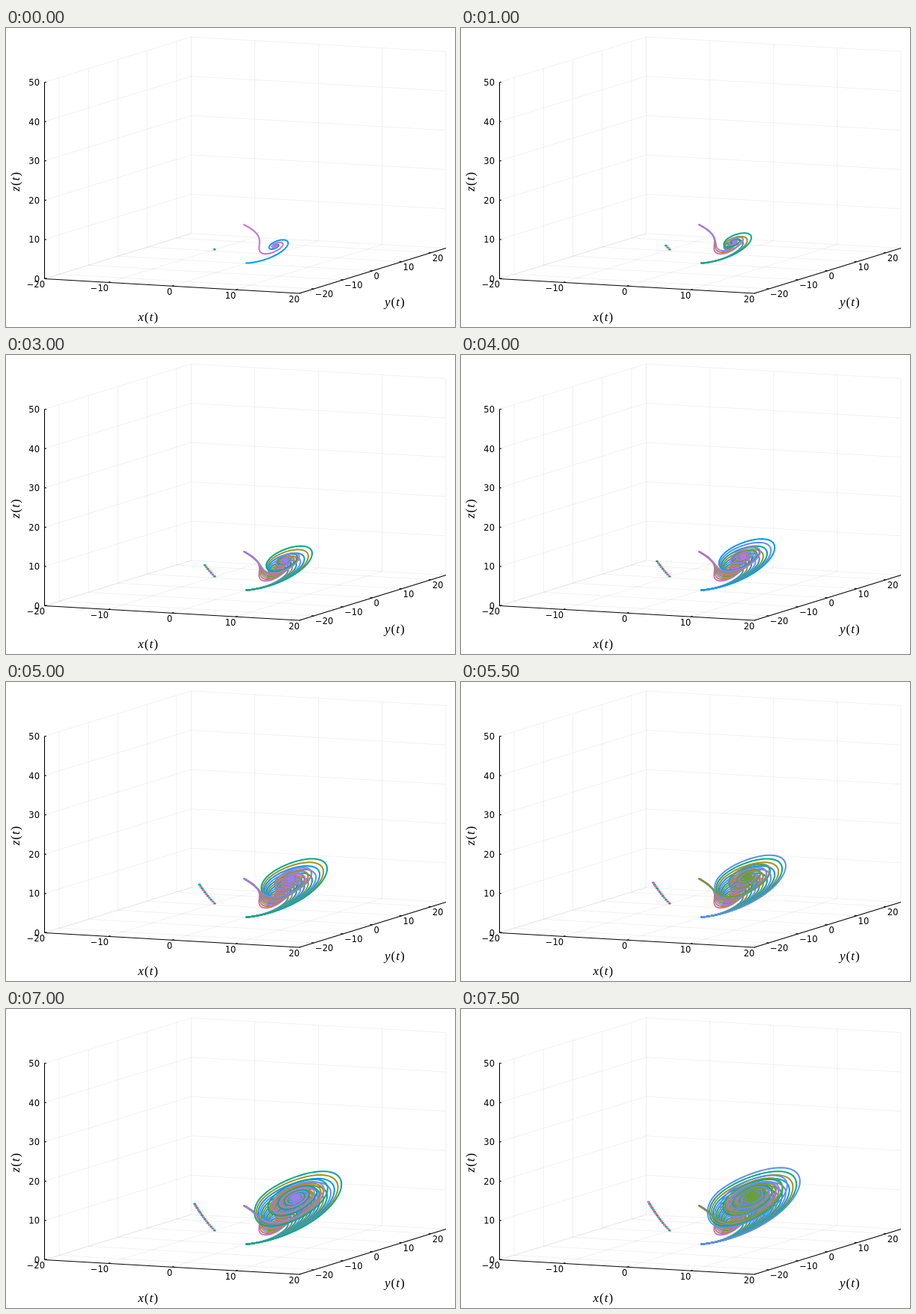
An HTML page with a canvas for the animation above (8000 ms loop, 600 px wide and 400 px high).

```html
<!DOCTYPE html>
<html lang="en">
<head>
<meta charset="utf-8">
<title>Lorenz trajectories</title>
<style>
  html, body { margin: 0; width: 600px; height: 400px; overflow: hidden; background: #fff; }
  canvas { display: block; }
</style>
</head>
<body>
<canvas id="stage" width="600" height="400"></canvas>
<script>
const ctx = document.getElementById('stage').getContext('2d');
const COLORS = ['#009afa', '#e36f47', '#3ea44e', '#c371d2', '#ac8e18', '#00aaae', '#ed5e93', '#c68225',
  '#00a98d', '#8e971e', '#00a9cc', '#9b7fe9', '#618df6', '#f06073', '#dd65b6', '#6c9f33'];
const SIGMA = 10, BETA = 8 / 3, STEPS = 16, STEP_MS = 500;

// Parallel projection of (x, y, z) to the stage
const project = ([x, y, z]) => [319.7 + 8.51 * x + 3.92 * y, 315 + 0.49 * x - 1.21 * y - 5.26 * z];

function line(a, b, color, width) {
  ctx.strokeStyle = color;
  ctx.lineWidth = width;
  ctx.beginPath();
  ctx.moveTo(...project(a));
  ctx.lineTo(...project(b));
  ctx.stroke();
}

function label(text, point, dx, dy, align) {
  const [x, y] = project(point);
  ctx.textAlign = align;
  ctx.fillText(String(text).replace('-', '\u2212'), x + dx, y + dy);
}

function mathLabel(name, x, y, angle = 0) {
  ctx.save();
  ctx.translate(x, y);
  ctx.rotate(angle);
  ctx.textAlign = 'left';
  ctx.textBaseline = 'alphabetic';
  let left = -13.5;
  for (const ch of name + '(t)') {
    ctx.font = (/[()]/.test(ch) ? '' : 'italic ') + '17px "Liberation Serif", serif';
    ctx.fillText(ch, left, 5);
    left += ctx.measureText(ch).width + 1;
  }
  ctx.restore();
}

function drawAxes() {
  const grid = 'rgba(0,0,0,0.1)', black = '#000';
  const ticks = [-20, -10, 0, 10, 20], heights = [0, 10, 20, 30, 40, 50];
  for (const v of ticks) {
    line([v, -25, 0], [v, 25, 0], grid, 0.6);
    line([v, 25, 0], [v, 25, 50], grid, 0.6);
    line([-20, v, 0], [20, v, 0], grid, 0.6);
    line([-20, v, 0], [-20, v, 50], grid, 0.6);
  }
  for (const z of heights) {
    line([-20, -25, z], [-20, 25, z], grid, 0.6);
    line([-20, 25, z], [20, 25, z], grid, 0.6);
  }
  line([-20, -25, 0], [-20, -25, 50], black, 1.1);
  line([-20, -25, 0], [20, -25, 0], black, 1.1);
  line([20, -25, 0], [20, 25, 0], black, 1.1);

  ctx.fillStyle = black;
  ctx.font = '11.5px "DejaVu Sans", sans-serif';
  ctx.textBaseline = 'middle';
  for (const v of ticks) {
    line([v, -25, 0], [v, -24.3, 0], black, 1);
    line([20, v, 0], [19.6, v, 0], black, 1);
    label(v, [v, -25, 0], 0.5, 9, 'right');
    label(v, [20, v, 0], 1.5, 8.5, 'left');
  }
  for (const z of heights) {
    line([-20, -25, z], [-19.7, -25, z], black, 1);
    label(z, [-20, -25, z], -6.5, 1.5, 'right');
  }
  mathLabel('x', 190, 387);
  mathLabel('y', 519.5, 367);
  mathLabel('z', 13, 205, -Math.PI / 2);
}

const flow = ([x, y, z], rho) => [SIGMA * (y - x), x * (rho - z) - y, x * y - BETA * z];
const shift = (u, k, h) => u.map((v, i) => v + h * k[i]);

// Runge-Kutta solution of the Lorenz system as a path
function trajectory(u, rho) {
  const path = new Path2D(), h = 0.01;
  path.moveTo(...project(u));
  for (let n = 0; n < 2500; n++) {
    const k1 = flow(u, rho);
    const k2 = flow(shift(u, k1, h / 2), rho);
    const k3 = flow(shift(u, k2, h / 2), rho);
    const k4 = flow(shift(u, k3, h), rho);
    u = u.map((v, i) => v + h / 6 * (k1[i] + 2 * k2[i] + 2 * k3[i] + k4[i]));
    path.lineTo(...project(u));
  }
  return path;
}

const series = [];
for (let step = 0; step < STEPS; step++) {
  const rho = 5 + step / 2, c = Math.sqrt(BETA * (rho - 1)), near = c + 0.1;
  const starts = [[0.1, 0.1, 0.1], [near, near, rho - 1], [-near, -near, rho - 1], [-1.2, 2.2, 9.25]];
  for (const start of starts) series.push(trajectory(start, rho));
}

let shown = -1;
function frame() {
  const step = Math.floor(performance.now() / STEP_MS) % STEPS;
  if (step !== shown) {
    shown = step;
    ctx.fillStyle = '#fff';
    ctx.fillRect(0, 0, 600, 400);
    ctx.lineCap = 'butt';
    drawAxes();
    ctx.lineCap = ctx.lineJoin = 'round';
    ctx.lineWidth = 2;
    series.slice(0, 4 * (step + 1)).forEach((path, i) => {
      ctx.strokeStyle = COLORS[i % COLORS.length];
      ctx.stroke(path);
    });
  }
  requestAnimationFrame(frame);
}
frame();
</script>
</body>
</html>
```
